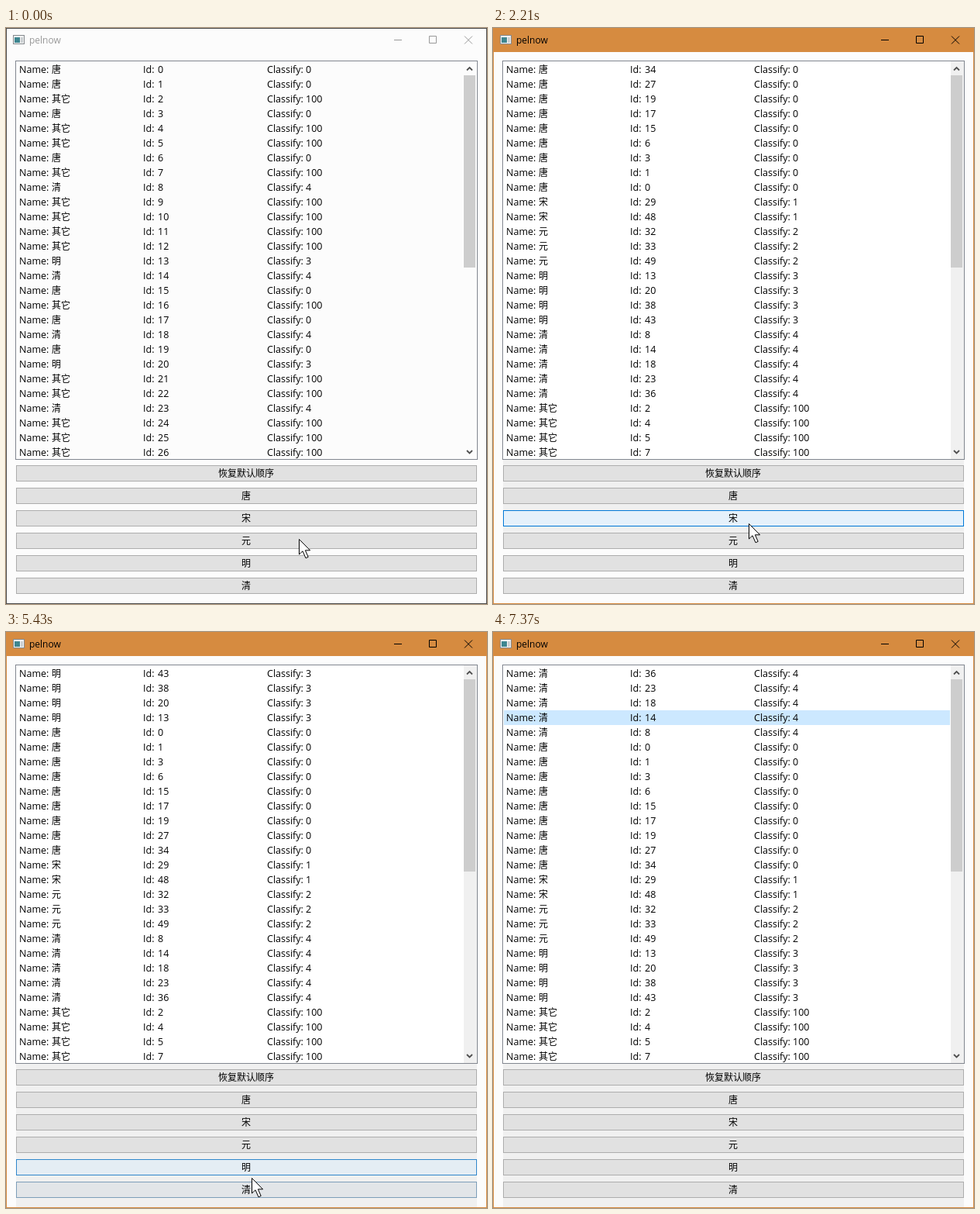
An HTML page that plays this animation: 621x743 px, repeating every 8 s.

```html
<!DOCTYPE html>
<html lang="zh-CN">
<head>
<meta charset="utf-8">
<style>
html, body { margin: 0; width: 100%; height: 100%; overflow: hidden; background: #fcfcfc; }
svg { display: block; width: 621px; height: 743px; overflow: hidden; }
text { font: 12.5px "Open Sans", "Noto Sans CJK SC", "Noto Sans CJK", sans-serif; white-space: pre; }
.zh { font: 12px "Noto Sans CJK SC", "Noto Sans CJK", sans-serif; }
rect { shape-rendering: crispEdges; }
</style>
</head>
<body>
<svg id="stage" viewBox="0 0 621 743"></svg>
<script>
const LOOP = 8000, FADE = 220, ROWS = 27, ROW_H = 19, LIST_TOP = 44;
const stage = document.getElementById('stage');

function el(tag, attrs, parent = stage, text) {
  const node = document.createElementNS('http://www.w3.org/2000/svg', tag);
  set(node, attrs);
  if (text !== undefined) node.textContent = text;
  return parent.appendChild(node);
}
function set(node, attrs) {
  for (const key in attrs) node.setAttribute(key, attrs[key]);
}
const box = (x, y, width, height, fill, stroke = 'none') =>
  el('rect', { x, y, width, height, fill, stroke });
const line = (d, stroke, width) =>
  el('path', { d, stroke, 'stroke-width': width, fill: 'none' });

// Items
const NAMES = { 0: '唐', 1: '宋', 2: '元', 3: '明', 4: '清', 100: '其它' };
const GROUPS = [[0, 1, 3, 6, 15, 17, 19, 27, 34], [29, 48], [32, 33, 49], [13, 20, 38, 43], [8, 14, 18, 23, 36]];
const items = Array.from({ length: 50 }, (_, id) => {
  const group = GROUPS.findIndex(g => g.includes(id));
  return { id, kind: group < 0 ? 100 : group };
});

// The chosen kind goes first with its ids descending, the rest ascend.
function sorted(kind) {
  if (kind < 0) return items;
  const first = items.filter(i => i.kind === kind).reverse();
  const rest = items.filter(i => i.kind !== kind);
  return first.concat(rest.sort((a, b) => a.kind - b.kind || a.id - b.id));
}

// Timeline
const SORTS = [[0, -1], [1070, 0], [2580, 1], [4110, 2], [5070, 3], [6130, 4]];
const GREY = [[0, 557], [420, 614], [1990, 664], [3740, 685], [4630, 715], [5290, 743]];
const ACTIVE_AT = 420, LIST_AT = 1070, SELECT_AT = 6930, SELECTED = 3;

// start, end, steps, x, y
const MOVES = [
  [60, 480, 6, 350, 574], [560, 700, 3, 337, 600], [1990, 2210, 4, 330, 639],
  [3740, 3960, 4, 326, 661], [4630, 4770, 3, 322, 684], [4850, 4920, 2, 320, 691],
  [5290, 5440, 3, 316, 711], [6270, 6350, 2, 292, 625], [6420, 6790, 6, 75, 118],
  [7150, 7370, 4, 60, 760]
];

// n: normal, h: hover, p: pressed
const STATES = {
  n: [[225, 225, 225], [173, 173, 173]],
  h: [[229, 241, 251], [0, 120, 215]],
  p: [[204, 228, 247], [0, 84, 153]]
};
const EVENTS = [
  [[360, 'h'], [420, 'p'], [500, 'h'], [640, 'n']],
  [[280, 'h'], [360, 'n'], [640, 'h'], [1000, 'p'], [1070, 'h'], [1990, 'n']],
  [[200, 'h'], [280, 'n'], [1990, 'h'], [2520, 'p'], [2580, 'h'], [3810, 'n']],
  [[60, 'h'], [200, 'n'], [3810, 'h'], [4040, 'p'], [4110, 'h'], [4700, 'n']],
  [[4700, 'h'], [5000, 'p'], [5070, 'h'], [5370, 'n']],
  [[5370, 'h'], [6050, 'p'], [6130, 'h'], [6310, 'n']]
];

const latest = (list, t) => list.reduce((value, [at, v]) => t >= at ? v : value, list[0][1]);

function pointer(t) {
  let x = 378, y = 659;
  for (const [start, end, steps, toX, toY] of MOVES) {
    if (t < start) break;
    const step = Math.floor((t - start) / (end - start) * (steps - 1) + 1e-6) + 1;
    const k = Math.min(1, step / steps);
    x += (toX - x) * k;
    y += (toY - y) * k;
  }
  return [Math.round(x), Math.round(y)];
}

function buttonColors(events, t) {
  let colors = STATES.n, from = STATES.n, to = STATES.n, since = -FADE;
  const at = time => {
    const k = Math.min(1, (time - since) / FADE);
    return from.map((c, i) => c.map((v, j) => v + (to[i][j] - v) * k));
  };
  for (const [time, state] of events) {
    if (time > t) break;
    colors = at(time);
    from = colors;
    to = STATES[state];
    since = time;
  }
  return at(t).map(c => `rgb(${c.map(Math.round)})`);
}

// Window
box(0, 0, 621, 743, '#fcfcfc');
const titleBar = box(0, 0, 621, 31, '#fcfcfc');
box(9.5, 9.5, 14, 11, '#f4f4f4', '#858a8e');
box(11, 12, 7, 7, '#3f8791');
box(19, 12, 3, 7, '#c9ced1');
const title = el('text', { x: 30, y: 20, style: 'font-size:12px' }, stage, 'pelnow');
const controls = line('M501 15.5H511M546.5 10.5H555.5V19.5H546.5ZM592 10.5L602 20.5M602 10.5L592 20.5', '#999', 1);
const greyArea = box(13, 557, 595, 0, '#f0f0f0');

// List
const listBox = box(12.5, 42.5, 596, 514, '#fcfcfc', '#828790');
const track = box(591, 43, 17, 513, '#fcfcfc');
const hoverRow = box(14, 0, 576, ROW_H, '#e5f3ff');
const selectRow = box(14, LIST_TOP + SELECTED * ROW_H, 576, ROW_H, '#cce8ff');
box(591, 61, 15, 248, '#cdcdcd');
line('M595 54.5L598.5 51L602 54.5M595 545L598.5 548.5L602 545', '#505050', 1.8);

const rows = Array.from({ length: ROWS }, (_, i) => {
  const y = LIST_TOP + i * ROW_H + 14;
  return [['Name: ', 17, 59, 'zh'], ['Id: ', 177, 196, ''], ['Classify: ', 337, 387, '']].map(([label, x, valueX, cls]) => {
    const cell = el('text', { x, y }, stage, label);
    return el('tspan', { x: valueX, class: cls }, cell);
  });
});

// Buttons
const buttons = ['恢复默认顺序', '唐', '宋', '元', '明', '清'].map((label, i) => {
  const y = 564 + 29 * i;
  const face = box(13.5, y + 0.5, 594, 20, '#e1e1e1', '#adadad');
  el('text', { x: 310, y: y + 15, class: 'zh', 'text-anchor': 'middle' }, stage, label);
  return face;
});

const edge = box(0.5, 0.5, 620, 742, 'none', '#4a4a4a');
const arrow = el('path', {
  d: 'M.5 .5V20L5 15.8L9 24.8L12.2 23.4L8.4 14.8H14.6Z',
  fill: '#fff', stroke: '#000', 'stroke-width': 1
});

let shown;
function showOrder(kind) {
  if (kind === shown) return;
  shown = kind;
  const order = sorted(kind);
  rows.forEach(([name, id, classify], i) => {
    name.textContent = NAMES[order[i].kind];
    id.textContent = order[i].id;
    classify.textContent = order[i].kind;
  });
}

function render(t) {
  const active = t >= ACTIVE_AT, fresh = t >= LIST_AT;
  set(titleBar, { fill: active ? '#d68b40' : '#fcfcfc' });
  set(edge, { stroke: active ? '#d68b40' : '#4a4a4a' });
  set(title, { fill: active ? '#000' : '#999' });
  set(controls, { stroke: active ? '#000' : '#999' });
  set(greyArea, { height: latest(GREY, t) - 557 });
  set(listBox, { fill: fresh ? '#fff' : '#fcfcfc' });
  set(track, { fill: fresh ? '#f0f0f0' : '#fcfcfc' });
  showOrder(latest(SORTS, t));

  buttons.forEach((face, i) => {
    const [fill, stroke] = buttonColors(EVENTS[i], t);
    set(face, { fill, stroke });
  });

  const [x, y] = pointer(t);
  const row = Math.floor((y - LIST_TOP) / ROW_H);
  set(arrow, { transform: `translate(${x} ${y})` });
  set(hoverRow, {
    y: LIST_TOP + row * ROW_H,
    visibility: row >= 0 && row < ROWS ? 'visible' : 'hidden'
  });
  set(selectRow, { visibility: t >= SELECT_AT ? 'visible' : 'hidden' });
}

const begin = performance.now();
function tick() {
  render((performance.now() - begin) % LOOP);
  requestAnimationFrame(tick);
}
render(0);
requestAnimationFrame(tick);
</script>
</body>
</html>
```
